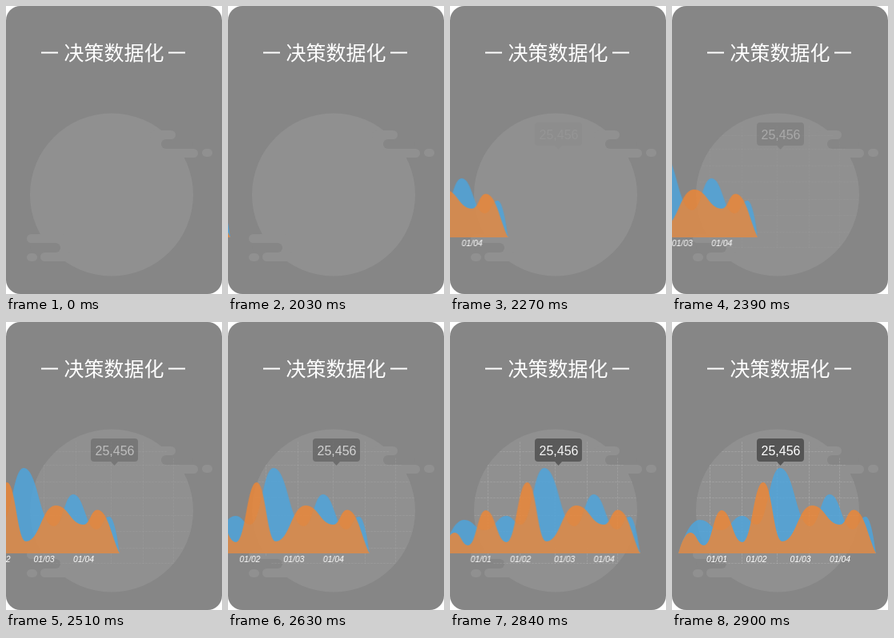
Animation of 270x361 px, one loop 4.57 s. Source, as an HTML page:

```html
<!DOCTYPE html>
<html lang="zh">
<head>
<meta charset="utf-8">
<title>决策数据化</title>
<style>
  html, body { margin: 0; width: 100%; height: 100%; overflow: hidden; background: #fff; }
  svg { display: block; width: 270px; height: 361px; }
  .title { font: 500 25px "Noto Sans CJK SC", "Noto Sans CJK", sans-serif; fill: #fff; }
  .value { font: 16px "Liberation Sans", Arial, sans-serif; fill: #fff; }
  .dates { font: italic 10.4px "Liberation Sans", Arial, sans-serif; fill: #fff; }
  .grid { fill: none; stroke: #fff; stroke-opacity: .13; stroke-dasharray: 3 1; }
  .chart { animation: slide 4570ms infinite; }
  .fade { animation: appear 4570ms infinite; }

  /* Both moves advance in 30 ms steps and end at 2900 ms. */
  @keyframes slide {
    0% { transform: translateX(-275px); animation-timing-function: step-end; }
    44.42% { transform: translateX(-252px); animation-timing-function: steps(29, end); }
    63.457%, 100% { transform: none; }
  }
  @keyframes appear {
    0% { opacity: 0; animation-timing-function: step-end; }
    49.015% { opacity: 0; animation-timing-function: steps(22, end); }
    63.457%, 100% { opacity: 1; }
  }
</style>
</head>
<body>
<svg viewBox="0 0 270 361">
  <clipPath id="disc"><circle cx="132" cy="236.5" r="102"/></clipPath>
  <rect width="270" height="361" rx="18" fill="#868686"/>

  <g fill="#909090">
    <circle cx="132" cy="236.5" r="102"/>
    <rect x="180" y="156" width="32" height="11" rx="5.5"/>
    <rect x="190" y="179" width="50" height="11" rx="5.5"/>
    <rect x="245" y="179" width="13" height="10" rx="5"/>
    <rect x="26" y="286" width="50" height="11" rx="5.5"/>
    <rect x="43" y="309" width="40" height="11" rx="5.5"/>
    <rect x="26" y="310" width="13" height="10" rx="5"/>
  </g>
  <g fill="#868686">
    <rect x="194" y="167" width="40" height="12" rx="6"/>
    <rect x="30" y="297" width="38" height="12" rx="6"/>
  </g>

  <path d="M44 58.5h21M203 58.5h21" stroke="#fff" stroke-width="2"/>
  <text class="title" x="72.5" y="67.5">决策数据化</text>

  <g class="fade" clip-path="url(#disc)">
    <path class="grid" d="M47.5 150v153M87.5 150v153M131.5 150v153M171.5 150v153M209.5 150v153
      M30 162.5h204M30 179.5h204M30 200.5h204M30 220.5h204M30 242.5h204M30 262.5h204M30 283.5h204M30 302.5h204"/>
  </g>

  <g class="chart">
    <path id="blue" fill="#4aa5e0" fill-opacity=".8"/>
    <path id="orange" fill="#f08632" fill-opacity=".8"/>
    <g class="dates">
      <text x="43" y="301">01/01</text>
      <text x="92.5" y="301">01/02</text>
      <text x="147.5" y="301">01/03</text>
      <text x="197" y="301">01/04</text>
    </g>
  </g>

  <g class="fade">
    <path d="M110 146h51a4 4 0 0 1 4 4v21a4 4 0 0 1-4 4h-21l-4.500 5-4.500-5h-21a4 4 0 0 1-4-4v-21a4 4 0 0 1 4-4z" fill="#555"/>
    <text class="value" x="111.500" y="166.500">25,456</text>
  </g>
</svg>
<script>
  // Waves run through alternating peaks and valleys with level tangents;
  // the outer ends meet the base line at a slope.
  function wave(id, points, endPull) {
    const last = points.length - 1;
    let d = `M${points[0]}`;
    for (let i = 1; i <= last; i++) {
      const [x0, y0] = points[i - 1], [x1, y1] = points[i];
      const dx = x1 - x0, dy = y1 - y0;
      const from = i === 1 ? [x0 + dx * .2, y0 + dy * .4] : [x0 + dx * .47, y0];
      const to = i === last ? [x1 - dx * endPull, y1 - dy * .4] : [x1 - dx * .47, y1];
      d += `C${from} ${to} ${x1},${y1}`;
    }
    document.getElementById(id).setAttribute("d", d + "Z");
  }

  wave("blue", [[8, 290], [35, 248], [61, 261], [88, 243], [106, 254], [135, 183],
    [173, 256], [197, 216], [226, 260], [242, 244], [255, 290]], .2);
  wave("orange", [[8, 290], [23, 264], [40, 280], [62, 236], [88, 276], [114, 201],
    [138, 275], [175, 230], [210, 254], [227, 235.500], [255, 290]], .38);
</script>
</body>
</html>
```
